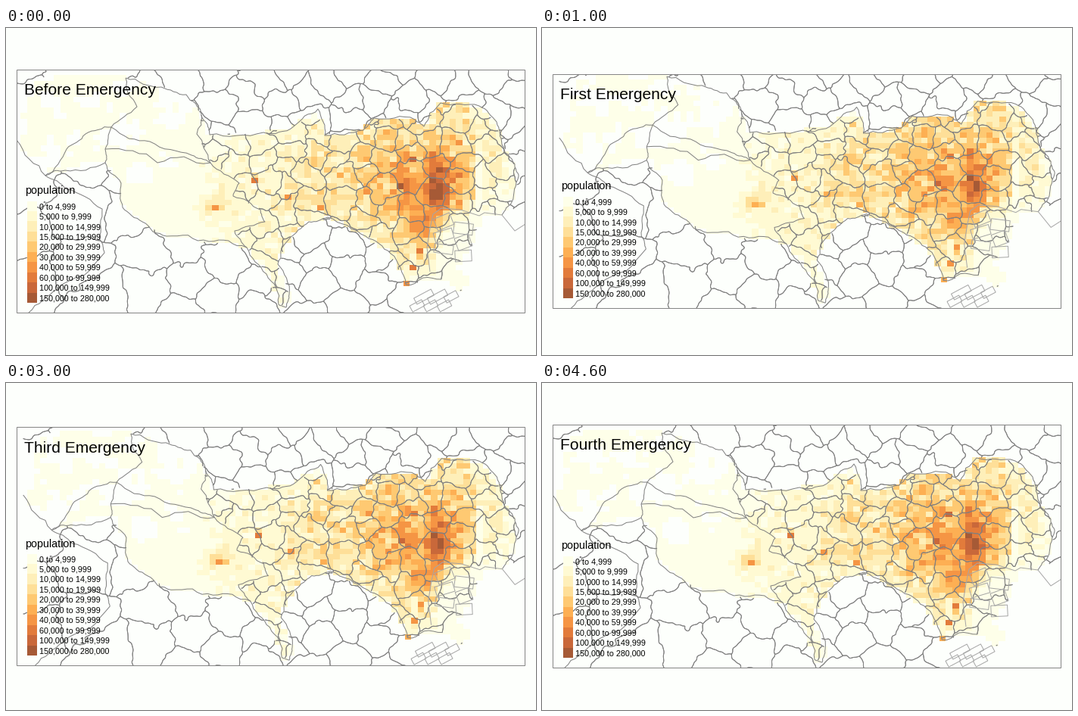
Recreate the animation shown at these times as a matplotlib script. Size 700x432 px, loop 5000 ms.

```python
import numpy as np
import matplotlib.pyplot as plt
from matplotlib.animation import FuncAnimation
from matplotlib.collections import LineCollection
from matplotlib.colors import ListedColormap
from matplotlib.patches import Rectangle
from matplotlib.path import Path
from matplotlib.transforms import Affine2D

W, H, DPI = 700, 432, 100
PX = 72 / DPI
LEFT, RIGHT, BASE = 14.5, 685.5, 376.5
COLORS = ["#feffe9", "#fffad3", "#feefb9", "#fedf98", "#fec972",
          "#fdaf53", "#f59544", "#e27b3b", "#c9683a", "#a65a36"]
BINS = [5, 10, 15, 20, 30, 40, 60, 100, 150]
LABELS = ["0 to 4,999", "5,000 to 9,999", "10,000 to 14,999",
          "15,000 to 19,999", "20,000 to 29,999", "30,000 to 39,999",
          "40,000 to 59,999", "60,000 to 99,999", "100,000 to 149,999",
          "150,000 to 280,000"]

# title, top edge, map scale, centre activity, home activity, empty share
PERIODS = [
    ("Before Emergency", 55.5, 1, 1, 1, .35),
    ("First Emergency", 61.5, .987, .5, 1.12, .48),
    ("Second Emergency", 55.5, 1, .68, 1.06, .4),
    ("Third Emergency", 58.5, .987, .66, 1.04, .45),
    ("Fourth Emergency", 55.5, 1, .75, 1.03, .42),
]

rng = np.random.default_rng(23)
fig = plt.figure(figsize=(W / DPI, H / DPI), dpi=DPI, facecolor="#fdfffc")
ax = fig.add_axes([0, 0, 1, 1])


def roughen(pts, amount=.12, levels=3):
    """Displace segment midpoints so that a few points give a natural border."""
    pts = np.array(pts, float)
    for _ in range(levels):
        d = np.diff(pts, axis=0)
        out = np.empty((2 * len(pts) - 1, 2))
        out[::2] = pts
        out[1::2] = pts[:-1] + d / 2 + (d[:, ::-1] * [-1, 1]
                                        * rng.uniform(-amount, amount, (len(d), 1)))
        pts = out
    return pts


# main outlines
coast_west = [(14, 148), (25, 110), (41, 67), (110, 60)]
north = [(158, 66), (205, 78), (238, 88), (258, 115), (269, 141), (340, 138),
         (380, 130), (412, 107), (421, 142), (472, 135), (486, 119), (540, 121),
         (552, 130), (574, 99), (625, 103), (648, 124), (655, 154), (672, 180),
         (677, 196), (668, 230), (655, 247)]
south = [(14, 148), (52, 195), (78, 188), (131, 178), (152, 205), (154, 237),
         (180, 256), (212, 275), (268, 282), (318, 290), (344, 325), (360, 365),
         (370, 369), (374, 352), (359, 312), (373, 280), (400, 256), (425, 250),
         (475, 275), (508, 298), (528, 339), (575, 332)]
bay = [(628, 250), (615, 290), (595, 315), (612, 335), (600, 348)]
divide = [(258, 115), (252, 140), (270, 178), (308, 205), (300, 222), (336, 240),
          (342, 256), (302, 268), (318, 290)]
hills = [
    [(158, 66), (173, 104), (139, 131), (131, 160), (131, 178)],
    [(52, 195), (80, 160), (105, 140), (139, 131)],
    [(139, 131), (190, 150), (245, 168), (270, 178)],
    [(131, 160), (200, 178), (270, 178)],
    [(52, 195), (80, 213), (127, 239), (124, 280), (130, 297), (68, 345), (30, 376)],
]
region = Path(coast_west + north + bay + south[::-1])
borders = [roughen(p) for p in [north, south, divide] + hills]

# smaller districts: nearest-centre areas with wavy edges
gx, gy = np.meshgrid(np.arange(14, 688, 1.5), np.arange(50, 379, 1.5))
land = region.contains_points(np.c_[gx.ravel(), gy.ravel()]).reshape(gx.shape)
dx, dy = np.transpose(divide)
suburbs = land & (gx > np.interp(gy, dy, dx))
sea = (gx > 528) & (gy > 240)


def centres(step_x, step_y):
    """Jittered lattice whose spacing shrinks from west to east."""
    x, out = 20, []
    while x < 700:
        sx, sy = (np.interp(x, [20, 250, 450], s) for s in (step_x, step_y))
        for y in np.arange(50 + rng.uniform(0, sy), 390, sy):
            out.append((x + rng.uniform(-.35, .35) * sx, y + rng.uniform(-.35, .35) * sy))
        x += sx
    return np.array(out)


def wave():
    total = 0
    for length in (50, 27, 15, 9):
        a, p, q = rng.uniform(0, 2 * np.pi, 3)
        u = (gx * np.cos(a) + gy * np.sin(a)) * 2 * np.pi / length
        v = (gy * np.cos(a) - gx * np.sin(a)) * 2 * np.pi / length
        total = total + length * .05 * (np.sin(u + p) + np.sin(v + q))
    return total


def districts(points, mask):
    wx, wy = gx + wave(), gy + wave()
    dist = np.array([np.hypot((wx - x) * .85, wy - y) for x, y in points])
    nearest = dist.argmin(0)
    first, second = np.partition(dist, 1, axis=0)[:2]
    for i in np.unique(nearest[mask]):
        rival = np.where(nearest == i, second, first)
        gap = np.ma.masked_where(~mask, dist[i] - rival)
        if gap.min() < 0 < gap.max():
            borders.extend(ax.contour(gx, gy, gap, [0]).allsegs[0])


districts(centres((60, 38, 31), (40, 25, 30)), suburbs)
districts(centres((85, 46, 38), (70, 42, 34)), ~land & ~sea)

# harbour islands and docks
docks = [np.array([(560, 322), (556, 290), (560, 265), (564, 246), (575, 238),
                   (600, 240), (625, 248), (632, 244), (655, 247), (672, 268), (686, 259)])]


def dock(x, y, w, h, angle):
    box = np.array([(-w, -h), (w, -h), (w, h), (-w, h), (-w, -h)]) / 2
    docks.append(Affine2D().rotate_deg(angle).translate(x, y).transform(box))


for i in range(6):
    dock(578 + 26 * (i % 2), 256 + 9 * i, rng.uniform(18, 28), rng.uniform(9, 18),
         rng.uniform(-28, 15))
for i in range(6):
    dock(543 + 9 * i, 367 - 12 * (i % 2), rng.uniform(16, 30), 9, -28)

# one-kilometre cells
CW, CH, X0, Y0 = 8.71, 7.15, 10.7, 55.25
xe, ye = X0 + CW * np.arange(79), Y0 + CH * np.arange(46)
cx, cy = np.meshgrid(xe[:-1] + CW / 2, ye[:-1] + CH / 2)
inside = region.contains_points(np.c_[cx.ravel(), cy.ravel()]).reshape(cx.shape)
grain = rng.normal(0, .3, cx.shape)
field = rng.normal(0, 1, cx.shape)
field = sum(np.roll(field, (i, j), (0, 1)) for i in (-1, 0, 1) for j in (-1, 0, 1)) / 3

# busiest stations: x, y, thousands of people
STATIONS = [(276, 237, 55), (328, 201, 85), (345, 330, 80), (372, 223, 52),
            (416, 237, 48), (442, 194, 38), (523, 206, 170), (537, 173, 125),
            (537, 316, 75), (546, 294, 72), (528, 337, 46), (600, 155, 46)]


def hill(x, y, sx, sy, power=2):
    """A bump; a higher power makes a flat top."""
    return np.exp(-(((cx - x) / sx) ** 2 + ((cy - y) / sy) ** 2) ** (power / 2))


HOMES = (1 + 6 * hill(350, 215, 95, 150, 4) + 9 * hill(450, 200, 75, 75, 4)
         + 15 * hill(535, 200, 75, 130, 4) + 9 * hill(620, 160, 55, 85, 4)
         + 9 * hill(272, 234, 24, 12))
WORK = (135 * hill(569, 207, 11, 28) + 48 * hill(524, 205, 11, 32)
        + 25 * hill(560, 225, 30, 45) + 22 * hill(590, 198, 22, 32)
        + 18 * hill(545, 255, 13, 35))
WATER = (1 - .85 * hill(625, 205, 6, 50)) * (1 - .9 * hill(598, 290, 34, 42, 4))


def population(n):
    centre, home, empty = PERIODS[n][3:]
    own = np.random.default_rng(100 + n)
    v = (HOMES * home + WORK * centre) * WATER
    v *= np.exp(grain + own.normal(0, .05, cx.shape))
    for x, y, people in STATIONS:
        v[int((y - Y0) / CH), int((x - X0) / CW)] = people * centre ** .55
    drift = field + own.normal(0, .25, cx.shape)
    gap = (cx < 245) & (cy < 215) & (drift > np.quantile(drift, 1 - empty))
    return np.ma.masked_where(~inside | gap, np.digitize(v, BINS))


def label(x, y, s, px):
    ax.text(x, y, s, family="Liberation Sans", fontsize=px * PX, color="black", zorder=5)


def draw(n):
    title, top, k = PERIODS[n][:3]
    bottom = H - top
    ax.clear()
    ax.axis("off")
    place = Affine2D().translate(-RIGHT, -BASE).scale(k).translate(RIGHT, bottom)
    place = place + ax.transData
    frame = Rectangle((LEFT, top), RIGHT - LEFT, bottom - top, fill=False,
                      ec="#858585", lw=PX, snap=False, zorder=4)
    ax.add_patch(frame)

    parts = [
        ax.pcolormesh(xe, ye, population(n), cmap=ListedColormap(COLORS),
                      vmin=-.5, vmax=9.5, transform=place, antialiased=False),
        LineCollection(borders, colors="#808080", linewidths=PX, transform=place),
        LineCollection(docks, colors="#a6a6a6", linewidths=PX, transform=place),
    ]
    for lines in parts[1:]:
        ax.add_collection(lines, autolim=False)
    for part in parts:
        part.set_clip_path(frame)

    label(24, top + 33, title, 21)
    label(25.5, bottom - 157, "population", 14.3)
    for i, (color, text) in enumerate(zip(COLORS, LABELS)):
        y = bottom - 141.2 + 13.45 * i
        ax.add_patch(Rectangle((28, y - 6.72), 13, 13.45, fc=color, ec="none",
                               antialiased=False, zorder=3))
        label(44, y + 3.8, text, 10.8)
    ax.set_xlim(0, W)
    ax.set_ylim(H, 0)
    return []


anim = FuncAnimation(fig, draw, frames=len(PERIODS), interval=1000,
                     repeat=True, repeat_delay=0)
plt.show()
```
